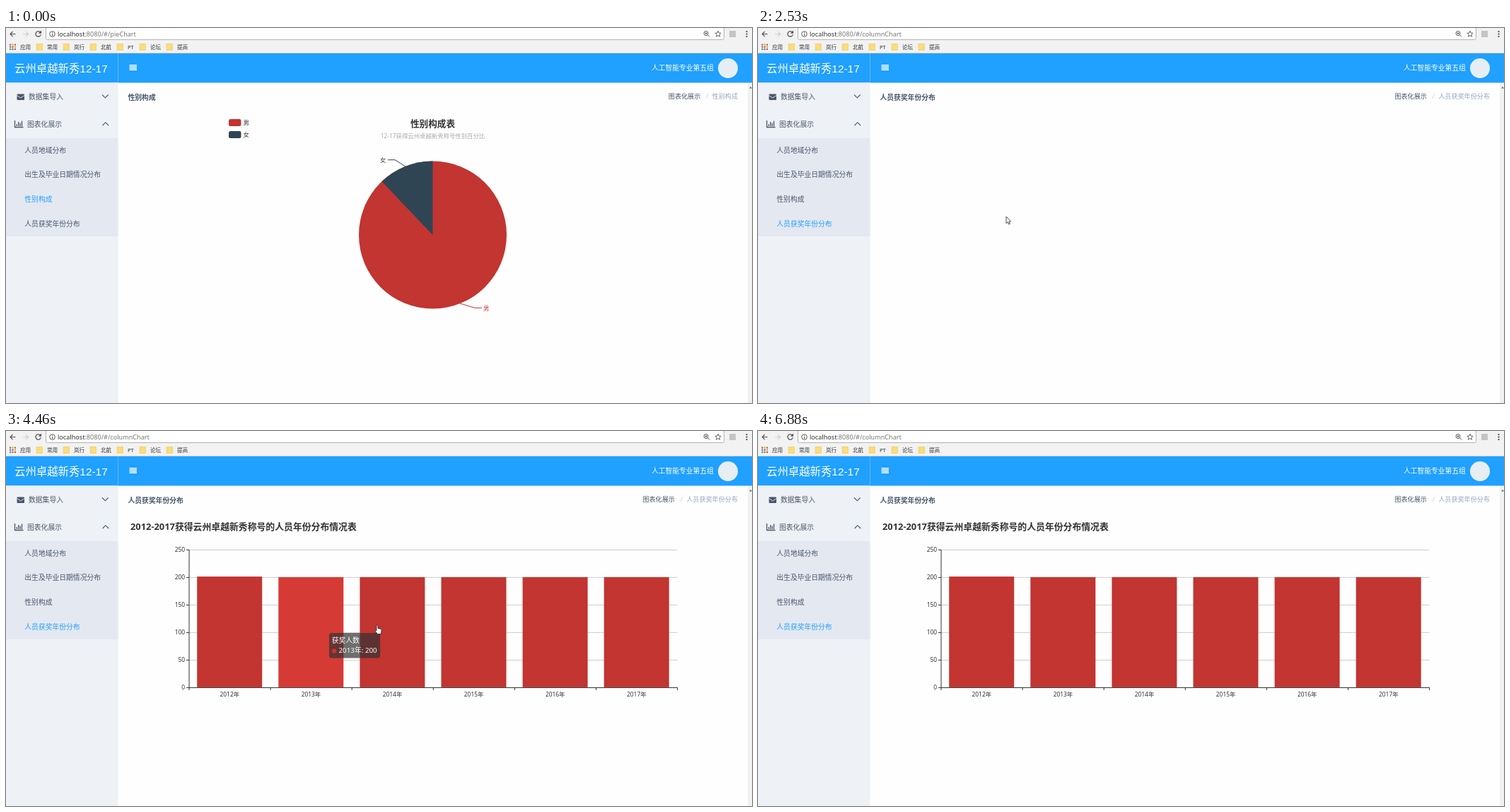
Recreate the animation shown at these times as an HTML page. Size 1055 by 531 pixels, loop 8110 ms.

```html
<!DOCTYPE html>
<html lang="zh-CN">
<head>
<meta charset="utf-8">
<style>
html, body { margin: 0; width: 100%; height: 100%; overflow: hidden; background: #fefefe; }
svg { display: block; font-family: "Noto Sans", "Noto Sans CJK SC", sans-serif; }
</style>
</head>
<body>
<svg id="stage" width="1055" height="531" viewBox="0 0 1055 531"></svg>
<script>
const LOOP = 8110;
const AWARD = '云州卓越新秀';
const RED = '#c23531', NAVY = '#2f4554', INK = '#48576a', BLUE = '#20a0ff';
const MENU = ['人员地域分布', '出生及毕业日期情况分布', '性别构成', '人员获奖年份分布'];
const BARS = 6, STEP = 115.1, BAR_LEFT = 270.2, BAR_WIDTH = 92, BASE = 362.9;

const text = (x, y, s, size, fill, extra = '') =>
  `<text x="${x}" y="${y}" font-size="${size}" fill="${fill}" ${extra}>${s}</text>`;
const rect = (x, y, w, h, fill, extra = '') =>
  `<rect x="${x}" y="${y}" width="${w}" height="${h}" fill="${fill}" ${extra}/>`;
const line = (d, stroke, width = 1) =>
  `<path d="${d}" fill="none" stroke="${stroke}" stroke-width="${width}"/>`;
const range = (n, f) => Array.from({ length: n }, (_, i) => f(i)).join('');
const BOLD = 'font-weight="700"', MID = 'text-anchor="middle"', END = 'text-anchor="end"';

function star(cx, cy, r) {
  return 'M' + Array.from({ length: 10 }, (_, i) => {
    const a = i * Math.PI / 5, d = i % 2 ? r * .45 : r;
    return `${cx + d * Math.sin(a)} ${cy - d * Math.cos(a)}`;
  }).join('L') + 'Z';
}

function bookmarks() {
  let x = 58;
  return ['常用', '岚行', '北航', 'PT', '论坛', '提高'].map(s => {
    const mark = rect(x - 15, 22.5, 8.5, 9, '#fbdc7c', 'stroke="#edc95c" stroke-width=".6"') +
      text(x, 30, s, 7.6, '#333');
    x += s === 'PT' ? 32 : 38;
    return mark;
  }).join('');
}

function browserBar() {
  const palette = ['#d9503f', '#e8a33d', '#4a9d5b', '#4a7fd0'];
  return rect(0, 0, 1055, 36, '#f2f2f2') + rect(0, 35, 1055, 1, '#c9ced3') +
    rect(56.5, -3, 959, 19.5, '#fff', 'rx="2" stroke="#b4b4b4"') +
    line('M13.5 8.5H6M9.5 5L6 8.5L9.5 12', '#555', 1.2) +
    line('M24 8.5H31.5M28 5L31.5 8.5L28 12', '#d0d0d0', 1.2) +
    line('M48.6 6.2A3.7 3.7 0 1 0 49.2 9.4M49.4 4V7H46.4', '#555', 1.3) +
    '<circle cx="65.5" cy="8.5" r="3.8" fill="none" stroke="#555"/>' + line('M65.5 8V11M65.5 6V7', '#555') +
    text(73, 11.6, 'localhost<tspan fill="#777">:8080/#/<tspan id="route"></tspan></tspan>', 9.1, '#333') +
    '<circle cx="990" cy="7.5" r="3" fill="none" stroke="#555"/>' +
    line('M992.3 9.8L995 12.5M988.5 7.5H991.5M990 6V9', '#555') +
    line(star(1007, 8.6, 4.4), '#555', .9) + rect(1023, 4, 9, 9, '#c4c4c4') +
    range(3, i => rect(1046.5, 4 + 3.5 * i, 2, 2, '#555')) +
    range(9, i => rect(5 + i % 3 * 3.4, 22.5 + Math.floor(i / 3) * 3.2, 2.2, 2.2, palette[i % 4])) +
    text(20, 30, '应用', 7.6, '#333') + bookmarks();
}

function header() {
  return rect(0, 36, 1055, 41.5, BLUE) + rect(158, 36, 1, 41.5, '#62bcff') +
    text(12, 62.5, AWARD + '12-17', 15.4, '#fff', 'font-family="Liberation Sans, Noto Sans CJK SC, sans-serif"') +
    range(4, i => rect(174.5, 52 + 2.2 * i, 10.5, 1.4, '#fff')) +
    text(913, 60, '人工智能专业第五组', 9.75, '#fff') +
    '<circle cx="1021" cy="57" r="14" fill="#e6eef3"/>';
}

function sidebar() {
  return rect(0, 77.5, 158.5, 453.5, '#eef1f6') + rect(0, 156, 158.5, 139, '#e4e8f1') +
    rect(0, 260.5, 158.5, 34.5, '#d3dce6', 'id="hover"') +
    rect(15.5, 93.5, 10.5, 8.5, INK, 'rx="1"') + line('M15.5 95.5L20.8 99L26 95.5', '#eef1f6', .9) +
    line('M12.5 131V140.5H24.5M15.3 139V136M17.7 139V133M20.1 139V134.5M22.5 139V131.5', INK, 1.3) +
    text(32, 101, '数据集导入', 9.8, INK) + text(30, 139.5, '图表化展示', 9.8, INK) +
    line('M136 94.5L140.3 98.8L144.6 94.5M136.5 138L140.8 133.7L145.1 138', INK, 1.1) +
    MENU.map((s, i) => text(26.3, 176.5 + 34.8 * i, s, 9.8, INK, `id="item${i}"`)).join('');
}

function content() {
  return text(172.5, 102.3, '', 9.8, INK, BOLD + ' id="title"') +
    text(1035, 99.7, '', 9.1, '#97a8be', END + ' id="crumb"') +
    text(0, 99.7, '图表化展示', 9.1, INK, END + ' id="parent"') +
    text(0, 99.7, '/', 9.1, '#bfcbd9', MID + ' id="slash"') +
    rect(1049, 78, 6, 453, '#f1f1f1') + '<path d="M1051 85.5L1053 83L1055 85.5Z" fill="#666"/>';
}

function pie() {
  const cx = 603.5, cy = 293, r = 104.5, a = 43.6 * Math.PI / 180;
  const ex = cx - r * Math.sin(a), ey = cy - r * Math.cos(a);
  const legend = (y, s, c) => rect(315, y, 17.5, 10, c, 'rx="2.5"') + text(335.5, y + 8.2, s, 8.4, '#333');
  return '<g id="pie">' + legend(129, '男', RED) + legend(146, '女', NAVY) +
    text(cx, 140.3, '性别构成表', 12.6, '#333', BOLD + MID) +
    text(cx, 156.3, `12-17获得${AWARD}称号性别百分比`, 8.4, '#aaa', MID) +
    `<circle cx="${cx}" cy="${cy}" r="${r}" fill="${RED}"/>` +
    `<path d="M${cx} ${cy}L${ex} ${ey}A${r} ${r} 0 0 1 ${cx} ${cy - r}Z" fill="${NAVY}"/>` +
    line('M565 196L550 186.7H540', NAVY) + text(529, 190, '女', 8.4, NAVY) +
    line('M642 390L663 396.3H673', RED) + text(675, 399.5, '男', 8.4, RED) + '</g>';
}

function columns() {
  return '<g id="columns">' +
    text(176, 140.3, `2012-2017获得${AWARD}称号的人员年份分布情况表`, 12.85, '#333', BOLD) +
    range(6, i => {
      const y = 363.4 - 39 * i;
      return line(`M259 ${y}H949.5`, '#ccc') + line(`M255 ${y}H259`, '#333') +
        text(253, y + 3, 50 * i, 8.4, '#333', END);
    }) +
    range(BARS, i => rect(BAR_LEFT + STEP * i, BASE, BAR_WIDTH, 0, RED, `id="bar${i}"`) +
      text(316.3 + STEP * i, 375.7, 2012 + i + '年', 8.4, '#333', MID)) +
    line('M259 168V363.4H949.5', '#333') +
    range(BARS + 1, i => line(`M${259 + STEP * i} 363V367`, '#333')) + '</g>';
}

function overlay() {
  const outline = 'fill="#fff" stroke="#222" stroke-width=".8" stroke-linejoin="round"';
  return '<g id="tip">' + rect(0, 0, 72, 35.5, '#323232', 'rx="3" fill-opacity=".7"') +
    text(3.7, 14.3, '获奖人数', 9.8, '#fff') + `<circle cx="7" cy="25.5" r="3.3" fill="${RED}"/>` +
    text(13.5, 28.4, '', 9.8, '#fff', 'id="tipText"') + '</g>' +
    `<g id="cursor"><path id="arrow" d="M0 0V9.6L2.2 7.6L3.8 11L5.3 10.4L3.8 7.1H6.7Z" ${outline}/>` +
    `<path id="hand" d="M-1 1A1 1 0 0 1 1 1V4.5L5 5.2Q6.3 5.6 6 7.3L5.2 12.5H.2L-2.8 8.2Q-3 6.8-1 7.6Z" ${outline}/></g>`;
}

const stage = document.getElementById('stage');
stage.innerHTML = rect(0, 0, 1055, 531, '#fefefe') + browserBar() + header() + sidebar() +
  content() + pie() + columns() + overlay();

const $ = id => document.getElementById(id);
const set = (id, attrs) => { for (const k in attrs) $(id).setAttribute(k, attrs[k]); };
const show = (id, on) => set(id, { visibility: on ? 'visible' : 'hidden' });
const clamp = v => Math.min(1, Math.max(0, v));
const ease = p => p * p * (3 - 2 * p);

// Where the pointer rests or turns: [time, x, y]
const STOPS = [[70, 944, 522], [560, 57, 300], [860, 102, 286], [1640, 103, 285],
  [2120, 351, 267], [3600, 351, 267], [4310, 437, 266], [4460, 525, 275],
  [5790, 801, 271], [5940, 464, 278], [6350, 300, 290], [6700, 627, 433]];
const LAG = 150; // the chart reacts this long after the pointer

function pointer(t) {
  const i = STOPS.findIndex(s => s[0] > t);
  if (i < 0) return STOPS.at(-1).slice(1);
  const [t1, x1, y1] = STOPS[i], [t0, x0, y0] = STOPS[Math.max(0, i - 1)];
  const p = t1 > t0 ? ease((t - t0) / (t1 - t0)) : 0;
  return [x0 + (x1 - x0) * p, y0 + (y1 - y0) * p];
}

function drawPage(t) {
  const active = t < 1320 ? 2 : 3;
  const name = MENU[active], left = 1035 - 9.1 * name.length;
  $('route').textContent = active === 2 ? 'pieChart' : 'columnChart';
  $('title').textContent = $('crumb').textContent = name;
  set('parent', { x: left - 16.3 });
  set('slash', { x: left - 7 });
  MENU.forEach((_, i) => set('item' + i, { fill: i === active ? BLUE : INK }));
  set('pie', { opacity: t < 1320 ? 1 : clamp(1 - (t - 1260) / 240) });
  show('columns', t >= 2700);
}

// Draws bars and tooltip, and tells whether a bar is under the pointer.
function drawChart(t) {
  const [x, y] = pointer(t - LAG);
  const near = Math.floor((x - BAR_LEFT) / STEP);
  const inside = t >= 3600 && y < BASE;
  const onBar = inside && x - BAR_LEFT - near * STEP < BAR_WIDTH;
  const p = clamp((t - 2653) / 1000);
  const grow = p < 1 ? 1 - 2 ** (-10 * p) : 1;
  const count = i => i ? 200 : 201;

  for (let i = 0; i < BARS; i++) {
    const height = count(i) * .78 * grow;
    set('bar' + i, { y: BASE - height, height, fill: onBar && i === near ? '#d63a35' : RED });
  }
  show('tip', inside);
  set('tip', { transform: `translate(${x + 20} ${y + 20})` });
  $('tipText').textContent = `${2012 + near}年: ${count(near)}`;
  return onBar;
}

function draw(t) {
  drawPage(t);
  const onBar = drawChart(t);
  const [x, y] = pointer(t);
  const visible = t >= 70 && t < 6880;
  const inMenu = x < 158 && y > 156 && y < 295;
  const hand = inMenu || onBar;
  set('cursor', { transform: `translate(${x} ${y})` });
  show('arrow', visible && !hand);
  show('hand', visible && hand);
  show('hover', visible && inMenu && y > 260);
}

const start = performance.now();
function frame() {
  draw((performance.now() - start) % LOOP);
  requestAnimationFrame(frame);
}
frame();
</script>
</body>
</html>
```
